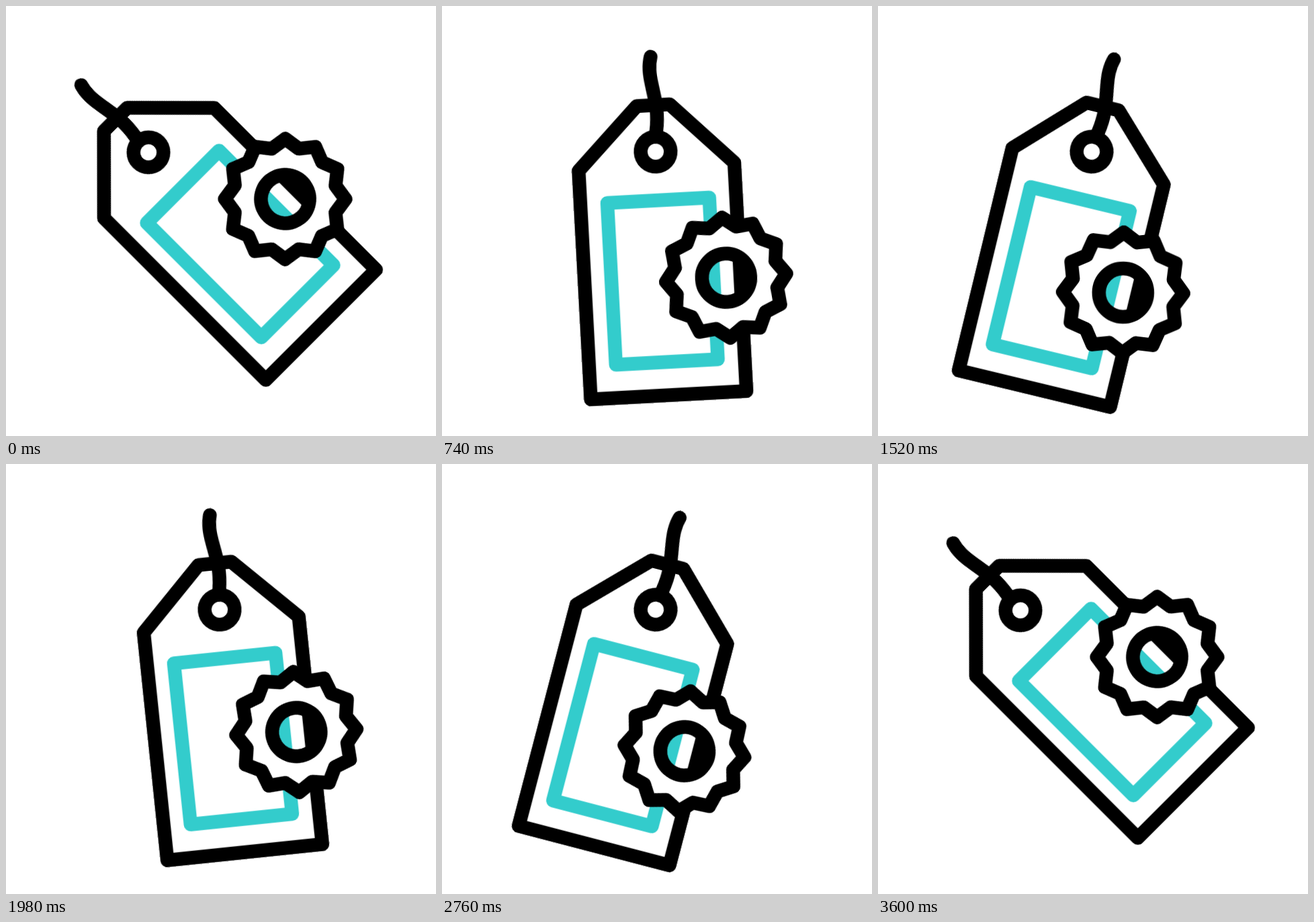
These frames come from a looping animation (640x640 px, 3620 ms). An HTML page:

```html
<!DOCTYPE html>
<html lang="en">
<head>
<meta charset="utf-8">
<title>Swinging tag</title>
<style>
  html, body { margin: 0; width: 100%; height: 100%; overflow: hidden; background: #fff; }
  svg { display: block; width: 100vw; height: 100vh; }
  svg * { fill: none; stroke: #000; stroke-width: 20.5; stroke-linecap: round; stroke-linejoin: round; }
  #label { stroke: #33cccc; }
  #face { fill: #fff; fill-rule: evenodd; stroke: none; }
</style>
</head>
<body>
<svg viewBox="0 0 640 640">
  <!-- The tag hangs upright with its hole at 0,0 -->
  <g id="tag">
    <path id="label" d="M-76 72.5H76V313.5H-76Z"/>
    <path d="M-24.5 -69.3H24.5L116 22.6V363H-116V22.6Z"/>
    <path d="M0 -141.5C-8 -114 4.5 -89 4.8 -57C5 -45 4 -36 1 -22"/>
    <circle r="22.3"/>
    <g transform="translate(94.75 193)">
      <g id="gear">
        <path id="face"/>
        <path id="rim"/>
        <circle r="36"/>
      </g>
    </g>
  </g>
</svg>
<script>
  const LOOP = 3620;
  const TEETH = 12, PEAK = 89.7, VALLEY = 77.5;
  const $ = id => document.getElementById(id);

  const points = Array.from({ length: TEETH * 2 }, (_, i) => {
    const a = i * Math.PI / TEETH, r = i % 2 ? VALLEY : PEAK;
    return `${(r * Math.sin(a)).toFixed(2)} ${(-r * Math.cos(a)).toFixed(2)}`;
  });
  const rim = `M${points.join('L')}Z`;
  $('rim').setAttribute('d', rim);
  $('face').setAttribute('d', rim + 'M-30 0A30 30 0 1 0 30 0A30 30 0 1 0 -30 0Z');

  const rest = [212.05, 217.8], hang = [318, 216.8];

  // time in ms, pivot, angle in degrees
  const swing = [
    [0, rest, -45],
    [400, hang, 15],
    [1000, hang, -15],
    [1600, hang, 15],
    [2200, hang, -15],
    [2800, hang, 15],
    [3200, rest, -45],
    [LOOP, rest, -45]
  ];
  const spin = [[0, 15], [3600, 375], [LOOP, 375]];

  const play = (id, frames) =>
    $(id).animate(frames, { duration: LOOP, iterations: Infinity });

  play('tag', swing.map(([t, [x, y], a]) => ({
    offset: t / LOOP,
    transform: `translate(${x}px, ${y}px) rotate(${a}deg)`,
    easing: 'cubic-bezier(.33333, 0, .66667, 1)'
  })));
  play('gear', spin.map(([t, a]) => ({
    offset: t / LOOP,
    transform: `rotate(${a}deg)`
  })));
</script>
</body>
</html>
```
